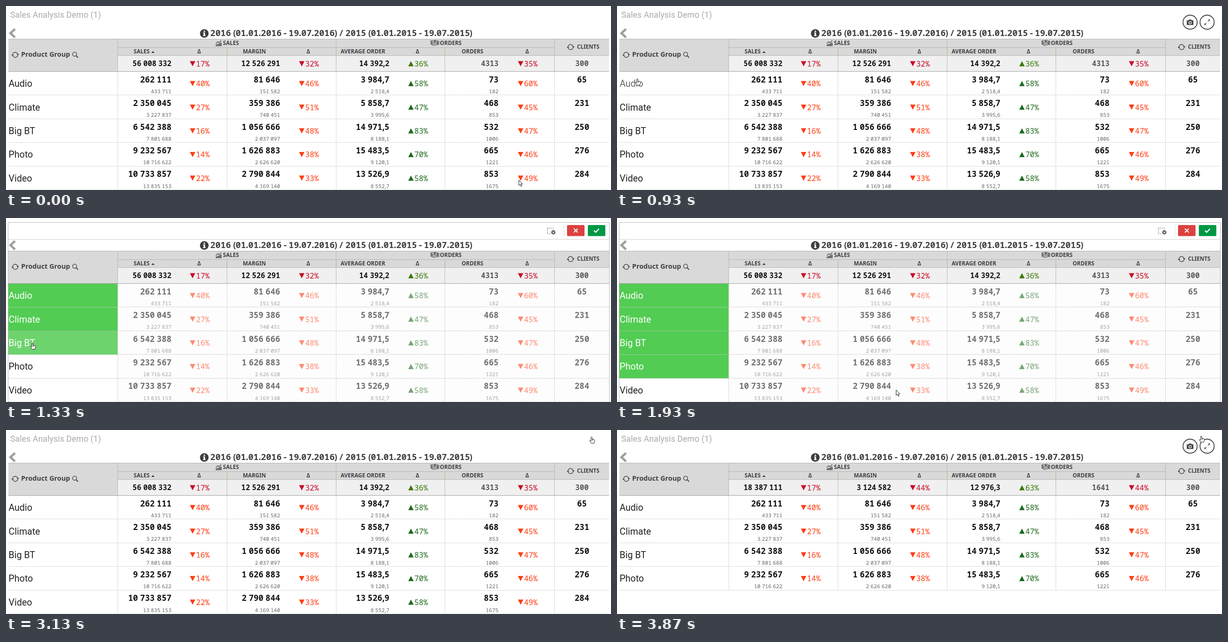
These frames come from a looping animation (1280 by 392 pixels, 4140 ms). An HTML page with a canvas:

```html
<!DOCTYPE html>
<html lang="en">
<head>
<meta charset="utf-8">
<title>Sales Analysis Demo</title>
<style>
html, body { margin: 0; width: 100%; height: 100%; overflow: hidden; background: #fff; }
canvas { display: block; }
</style>
</head>
<body>
<canvas id="stage" width="1280" height="392"></canvas>
<script>
const c = document.getElementById('stage').getContext('2d');
const LOOP = 4140, STEP = 200 / 3;
const MONO = '"Noto Sans Mono", "DejaVu Sans Mono", monospace';
const HEAD = '"Noto Sans", "Open Sans", sans-serif';
const BODY = 'Roboto, Inter, sans-serif';
const TOP = 139.5, ROW = 50.4, RIGHT = 1276;
const COLS = [236.5, 467.5, 698.5, 928.5, 1160.5];
const VALUE_X = [350, 580, 811, 1042], DELTA_X = [389, 620, 851, 1083];

// name, then value, previous value and change for four measures, then clients
const rows = [
  'Audio|262 111|433 711|-40|81 646|151 582|-46|3 984,7|2 518,4|58|73|182|-60|65',
  'Climate|2 350 045|3 227 837|-27|359 386|740 451|-51|5 858,7|3 995,6|47|468|853|-45|231',
  'Big BT|6 542 388|7 801 688|-16|1 056 666|2 037 097|-48|14 971,5|8 188,1|83|532|1006|-47|250',
  'Photo|9 232 567|10 716 622|-14|1 626 883|2 626 620|-38|15 483,5|9 120,1|70|665|1221|-46|276',
  'Video|10 733 857|13 835 153|-22|2 790 844|4 169 140|-33|13 526,9|8 552,7|58|853|1675|-49|284'
].map(r => r.split('|'));
const totalsAll = '56 008 332|-17|12 526 291|-32|14 392,2|36|4313|-35'.split('|');
const totalsPicked = '18 387 111|-17|3 124 582|-44|12 976,3|63|1641|-44'.split('|');

// pointer path: step, x, y
const path = [
  [0, 1085, 371], [1, 1070, 365], [4, 560, 280], [7, 110, 175], [8, 46, 160],
  [14, 43, 155], [16, 44, 162], [18, 50, 212], [20, 56, 266], [22, 63, 305],
  [23, 66, 312], [26, 66, 312], [27, 150, 335], [28, 350, 358], [29, 590.5, 366.5],
  [32, 1010, 240], [34, 1232, 118], [38, 1243, 35], [41, 1239, 14.5],
  [48, 1239, 14.5], [53, 1236, 12.5]
];

const clamp = v => Math.max(0, Math.min(1, v));

function pointer(k) {
  let i = 0;
  while (i < path.length - 2 && k > path[i + 1][0]) i++;
  const [a, ax, ay] = path[i], [b, bx, by] = path[i + 1];
  const p = clamp((k - a) / (b - a));
  return { x: ax + (bx - ax) * p, y: ay + (by - ay) * p };
}

function rect(x, y, w, h, color) {
  c.fillStyle = color;
  c.fillRect(x, y, w, h);
}

function line(points, color, width = 1) {
  c.beginPath();
  for (let i = 0; i < points.length; i += 2) c.lineTo(points[i], points[i + 1]);
  c.strokeStyle = color;
  c.lineWidth = width;
  c.stroke();
}

function poly(points, color) {
  c.beginPath();
  for (let i = 0; i < points.length; i += 2) c.lineTo(points[i], points[i + 1]);
  c.closePath();
  c.fillStyle = color;
  c.fill();
}

function disc(x, y, r, fill, stroke, width = 1) {
  c.beginPath();
  c.arc(x, y, r, 0, Math.PI * 2);
  if (fill) { c.fillStyle = fill; c.fill(); }
  if (stroke) { c.strokeStyle = stroke; c.lineWidth = width; c.stroke(); }
}

// baselines sit on whole pixels to stay crisp
function text(s, x, y, font, color, align = 'left') {
  c.font = font;
  c.fillStyle = color;
  c.textAlign = align;
  c.fillText(s, x, Math.round(y));
}

// fixed-width digits with narrow punctuation; align: 0 left, .5 centre, 1 right
function digits(s, x, y, cell, weight, color, align = 1) {
  const adv = ch => cell * (/\d/.test(ch) ? 1 : ch === '/' ? 0.73 : 0.44);
  const chars = [...s];
  x -= align * chars.reduce((w, ch) => w + adv(ch), 0);
  for (const ch of chars) {
    text(ch, x + adv(ch) / 2, y, `${weight} ${cell / 0.6}px ${MONO}`, color, 'center');
    x += adv(ch);
  }
}

function delta(v, x, mid, down, up) {
  const neg = v < 0, color = neg ? down : up;
  const base = neg ? mid - 5.5 : mid + 5.5, tip = neg ? mid + 5.5 : mid - 5.5;
  poly([x, base, x + 11.5, base, x + 5.75, tip], color);
  text(Math.abs(v) + '%', x + 13, mid + 6, `300 16px ${MONO}`, color);
}

function refresh(x, y) {
  for (const turn of [0, Math.PI]) {
    c.save();
    c.translate(x, y);
    c.rotate(turn);
    c.beginPath();
    c.arc(0, 0, 5.5, Math.PI * 1.1, Math.PI * 1.9);
    c.strokeStyle = '#404040';
    c.lineWidth = 1.3;
    c.stroke();
    poly([2.8, -1.4, 8.2, -1.4, 5.6, 1.8], '#404040');
    c.restore();
  }
}

function icons() {
  line([19, 49, 9.5, 58, 19, 67], '#a0a0a0', 5);
  disc(419.5, 58.5, 9.2, '#3c3c3c');
  rect(418, 52.5, 3.2, 2.6, '#fff');
  rect(418, 56.5, 3.2, 7, '#fff');
  rect(416.8, 56.5, 2, 1.5, '#fff');
  rect(416.6, 62.5, 6, 1.6, '#fff');
  refresh(19.5, 104);
  refresh(1194.5, 87.5);
  disc(145.2, 102.7, 4.3, null, '#404040', 1.4);
  line([148.4, 106, 152.5, 110], '#404040', 1.8);
  poly([307.5, 100, 314.5, 100, 311, 96], '#404040');
  for (let i = 0; i < 4; i++) rect(444 + i * 3.2, 82 - i * 1.3, 2.2, 3.5 + i * 1.3, '#404040');
  line([444, 80, 448, 76, 451, 78, 455.5, 73.5], '#404040', 1.2);
  for (const dy of [6, 3, 0]) {
    const sheet = [898, 74.5 + dy, 909, 73 + dy, 916, 75.5 + dy, 904, 78 + dy];
    poly(sheet, '#d9d9d9');
    line([...sheet, 898, 74.5 + dy], '#404040', 1.1);
  }
  disc(907, 75.3, 1.6, '#404040');
}

function header(totals) {
  rect(5, 71, RIGHT - 5, 68, '#d9d9d9');
  rect(237, 106, RIGHT - 237, 33, '#f0f0f0');
  line([5, 70.5, RIGHT, 70.5], '#b0b0b0');
  line([236, 88.5, 1160, 88.5], '#b5b5b5');
  line([236, 105.5, RIGHT, 105.5], '#b5b5b5');
  line([5, 139.5, RIGHT, 139.5], '#a0a0a0');
  COLS.forEach((x, i) => {
    const group = i % 2 === 0;
    line([x, group ? 71 : 88, x, 139], '#b8b8b8');
    if (i && i < 4) line([x, 89, x, 106], '#a9bd74');
  });

  digits('2016 (01.01.2016 - 19.07.2016) / 2015 (01.01.2015 - 19.07.2015)', 432, 64, 11, 700, '#404040', 0);
  const small = `bold 11.6px ${HEAD}`, ink = '#404040';
  text('Product Group', 32, 108, `bold 14.3px ${HEAD}`, ink);
  text('SALES', 459, 83, small, ink);
  text('ORDERS', 918, 83, small, ink);
  text('CLIENTS', 1208, 91, small, ink);
  ['SALES', 'MARGIN', 'AVERAGE ORDER', 'ORDERS'].forEach((s, i) => {
    text(s, [270, 501, 708, 964][i], 101, small, ink);
    text('Δ', DELTA_X[i] + 19.5, 101, small, ink, 'center');
    digits(totals[i * 2], VALUE_X[i], 128, 9.25, 700, i === 3 ? '#595959' : '#161616');
    delta(+totals[i * 2 + 1], DELTA_X[i], 123, '#cc0a24', '#3a7a08');
  });
  digits('300', 1218.5, 128, 9.5, 700, '#595959', 0.5);
  icons();
}

function hatch() {
  c.save();
  c.beginPath();
  c.rect(237, 140, RIGHT - 237, 252);
  c.clip();
  for (let x = 237; x < RIGHT + 252; x += 5) line([x, 140, x - 252, 392], 'rgba(0,0,0,.035)');
  c.restore();
}

function body(count, selecting, picked, hover) {
  if (selecting) hatch();
  for (let i = 0; i < count; i++) {
    const r = rows[i], y = TOP + ROW * i, on = selecting && i < picked;
    if (on) rect(5, y + 0.5, 231, ROW, i === hover ? '#6dd36d' : '#52cc52');
    const ink = on ? '#fff' : !selecting && i === hover ? '#666' : '#222';
    text(r[0], 5.5, y + 32.6, `19.5px ${BODY}`, ink);
    c.globalAlpha = selecting ? 0.6 : 1;
    for (let m = 0; m < 4; m++) {
      digits(r[m * 3 + 1], VALUE_X[m], y + 23.2, 10.3, 700, '#141414');
      digits(r[m * 3 + 2], VALUE_X[m], y + 46.4, 6.75, 400, '#666');
      delta(+r[m * 3 + 3], DELTA_X[m], y + 25.7, '#ff3d14', '#1f6b1f');
    }
    digits(r[13], 1218.5, y + 23.2, 10.3, 700, '#141414', 0.5);
    c.globalAlpha = 1;
  }
  for (let i = 1; i <= count; i++) {
    const y = Math.floor(TOP + ROW * i) + 0.5;
    if (selecting) c.setLineDash([1, 1]);
    line([5, y, RIGHT, y], selecting ? '#b4b4b4' : '#dcdcdc');
    c.setLineDash([]);
  }
  for (const x of COLS) line([x, 140, x, Math.min(392, TOP + ROW * count)], '#d9d9d9');
}

function roundButtons(alpha) {
  if (!alpha) return;
  c.globalAlpha = alpha;
  const ink = '#444';
  for (const x of [1212.5, 1248.5]) disc(x, 34.5, 15, '#fff', ink, 1.8);
  rect(1205.5, 30.5, 14, 10, ink);
  rect(1209.5, 28.8, 6, 2, ink);
  disc(1212.5, 35.5, 3.3, '#fff');
  disc(1212.5, 35.5, 2, ink);
  for (const s of [1, -1]) {
    const x = 1248.5, y = 34.5;
    line([x + 1.5 * s, y - 1.5 * s, x + 5 * s, y - 5 * s], ink, 1.3);
    poly([x + 6 * s, y - 6 * s, x + 2.2 * s, y - 6 * s, x + 6 * s, y - 2.2 * s], ink);
  }
  c.globalAlpha = 1;
}

function button(x, color) {
  c.beginPath();
  c.roundRect(x, 15, 37, 23.5, 2);
  c.fillStyle = color;
  c.fill();
}

function toolbar(green) {
  line([4.5, 392, 4.5, 9.5, 1276.5, 9.5, 1276.5, 392], '#b8b8b8');
  line([5, 45.5, RIGHT, 45.5], '#cfcfcf');
  line([1180.5, 15, 1180.5, 39], '#dedede');
  c.setLineDash([2, 2]);
  c.strokeStyle = '#595959';
  c.strokeRect(1145.5, 21.5, 13, 12);
  c.setLineDash([]);
  disc(1158, 30.5, 5.4, '#fff');
  disc(1158, 30.5, 4.4, '#595959');
  line([1156.3, 28.8, 1159.7, 32.2], '#fff', 1.1);
  line([1159.7, 28.8, 1156.3, 32.2], '#fff', 1.1);
  button(1187, '#dc423f');
  line([1201.5, 22.7, 1209.5, 30.7], '#fff', 2);
  line([1209.5, 22.7, 1201.5, 30.7], '#fff', 2);
  button(1231, green);
  line([1244, 26.8, 1247.7, 30.3, 1254.6, 23], '#fff', 2.4);
}

const arrowShape = new Path2D('M0 0V11.3L2.6 9L4.6 13.4L6.4 12.6L4.5 8.3H8.2Z');
const handShape = new Path2D('M-1.2 1Q0 -.6 1.2 1V5L5.3 5.8Q7 6.3 6.6 9L5.4 13.6H-.8L-4 8.7Q-4 7.2 -2.5 7.6L-1.2 9Z');

function cursor(p, hand) {
  const shape = hand ? handShape : arrowShape;
  c.save();
  c.translate(p.x, p.y);
  c.fillStyle = '#fff';
  c.fill(shape);
  c.strokeStyle = '#222';
  c.lineWidth = 1;
  c.stroke(shape);
  if (hand) for (const x of [1.2, 3]) line([x, 5.5, x, 8], '#222', 0.8);
  c.restore();
}

function draw(time) {
  const k = Math.floor((time % LOOP + 4) / STEP);
  const p = pointer(k);
  const selecting = k >= 15 && k < 47, filtered = k >= 50;
  const overName = p.x < 237 && p.y > 140;
  const hover = overName ? Math.floor((p.y - TOP) / ROW) : -1;
  const picked = k < 24 ? hover + 1 : 4;

  rect(0, 0, 1280, 392, '#fff');
  header(filtered ? totalsPicked : totalsAll);
  body(filtered ? 4 : 5, selecting, picked, hover);
  if (selecting) {
    toolbar(k === 44 ? '#006f32' : k >= 39 ? '#00873d' : '#009845');
  } else {
    text('Sales Analysis Demo (1)', 9, 25, `17.8px ${BODY}`, '#aaa');
    roundButtons(k < 15 ? clamp(k / 4) : clamp((k - 48) / 4));
  }
  cursor(p, overName || k >= 39);
}

function tick(now) {
  draw(now);
  requestAnimationFrame(tick);
}
draw(0);
requestAnimationFrame(tick);
</script>
</body>
</html>
```
